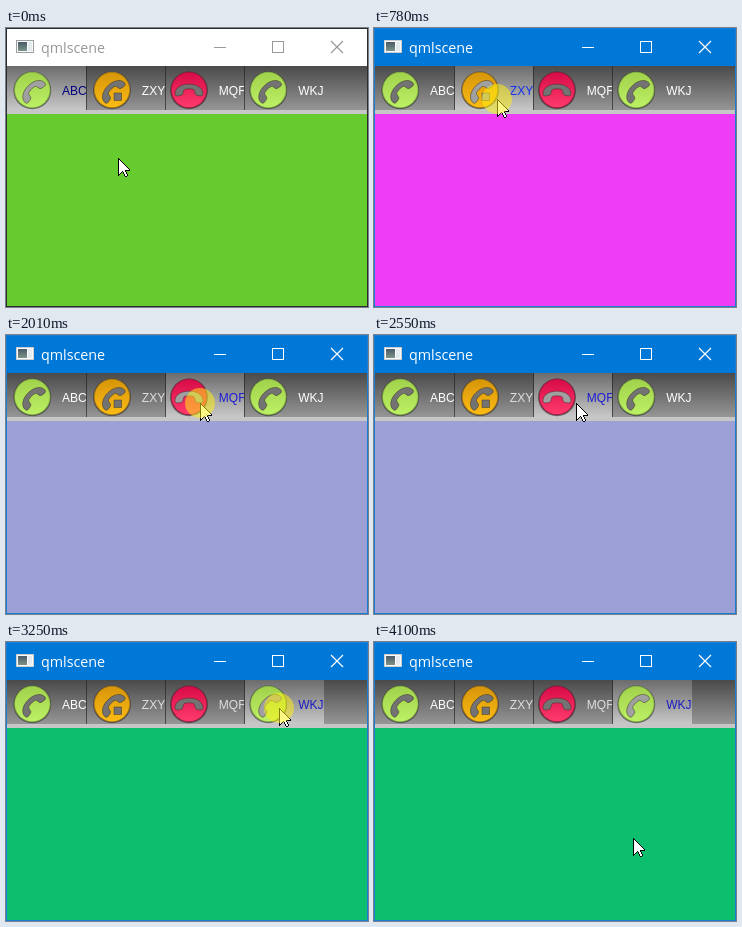
These frames come from a looping animation (362x279 px, 4.18 s). An HTML page with a canvas:

```html
<!DOCTYPE html>
<html lang="en">
<head>
<meta charset="utf-8">
<title>qmlscene</title>
<style>
html, body { margin: 0; width: 100%; height: 100%; overflow: hidden; }
canvas { display: block; width: 362px; height: 279px; }
</style>
</head>
<body>
<canvas id="stage"></canvas>
<script>
const W = 362, H = 279, LOOP = 4180;
const canvas = document.getElementById('stage');
const ctx = canvas.getContext('2d');
const dpr = window.devicePixelRatio || 1;
canvas.width = W * dpr;
canvas.height = H * dpr;

const LIME = ['#a2d24c', '#bcf064', '#83ad42'];
const tabs = [
  { x: 0, end: 80, icon: 26.3, label: 'ABC', textX: 56, skin: LIME, page: '#66cb2e', ink: '#00007c' },
  { x: 80, end: 159, icon: 106, label: 'ZXY', textX: 135.8, skin: ['#d8960a', '#fabb14', '#a87812'], page: '#ee3df4', ink: '#1230ea', house: true },
  { x: 159, end: 238, icon: 183, label: 'MQF', textX: 212.8, skin: ['#d80c48', '#ff3a6c', '#a01840'], page: '#9ca0d4', ink: '#1c1cd2', flat: true },
  { x: 238, end: 318, icon: 262.3, label: 'WKJ', textX: 292.2, skin: LIME, page: '#0cbf6e', ink: '#1c1cc4' }
];

// Moment from which each tab is the current one
const picks = [0, 780, 2010, 3250];
// Click halo visibility
const halos = [[780, 930], [2010, 2080], [3170, 3320]];
const moves = [
  { start: 80, end: 460, steps: 6, from: [112, 130], to: [123, 71] },
  { start: 1310, end: 1550, steps: 4, from: [123, 71], to: [194, 68] },
  { start: 2480, end: 2790, steps: 5, from: [194, 68], to: [273, 66] },
  { start: 3870, end: 4100, steps: 4, from: [273, 66], to: [259, 196] }
];

function pointerAt(t) {
  let pos = moves[0].from;
  for (const m of moves) {
    if (t < m.start) break;
    const gap = (m.end - m.start) / (m.steps - 1);
    const k = Math.min(m.steps, Math.floor((t - m.start) / gap + 1e-6) + 1);
    const p = k / m.steps, e = p * p * (3 - 2 * p);
    pos = m.from.map((v, i) => Math.round(v + (m.to[i] - v) * e));
  }
  return pos;
}

function rect(x, y, w, h, fill) {
  ctx.fillStyle = fill;
  ctx.fillRect(x, y, w, h);
}

function vertical(y0, y1, ...colors) {
  const g = ctx.createLinearGradient(0, y0, 0, y1);
  colors.forEach((c, i) => g.addColorStop(i / (colors.length - 1), c));
  return g;
}

function disc(x, y, r, fill) {
  ctx.fillStyle = fill;
  ctx.beginPath();
  ctx.arc(x, y, r, 0, Math.PI * 2);
  ctx.fill();
}

function text(str, x, y, font, fill) {
  ctx.font = font;
  ctx.fillStyle = fill;
  ctx.fillText(str, x, y);
}

function drawTitle(active) {
  const ink = active ? '#ffffff' : '#999999';
  rect(0, 0, W, 38, active ? '#0078d7' : '#ffffff');
  // Window symbol
  rect(10, 12, 18, 13, active ? '#c9ced2' : '#9b9fa2');
  rect(11, 13, 16, 11, '#fafafa');
  rect(12, 14, 9, 9, vertical(14, 23, '#4a5a68', '#7d9388'));
  rect(22, 14, 4, 9, '#e4ebee');

  text('qmlscene', 35, 25, '14.3px "Open Sans", "Noto Sans", sans-serif', ink);

  rect(208, 19, 12, 1, ink);
  ctx.strokeStyle = ink;
  ctx.lineWidth = 1;
  ctx.strokeRect(266.5, 13.5, 11, 11);
  ctx.lineWidth = 1.2;
  ctx.beginPath();
  ctx.moveTo(325, 13); ctx.lineTo(337, 25);
  ctx.moveTo(337, 13); ctx.lineTo(325, 25);
  ctx.stroke();
}

const handset = new Path2D('M-14 3.5C-13.5 -9 13.5 -9 14 3.5Q14 6 11.8 6L8 5.4Q6 5 5.9 2.6Q5.7 -.2 4.2 -.7Q0 -1.8 -4.2 -.7Q-5.7 -.2 -5.9 2.6Q-6 5 -8 5.4L-11.8 6Q-14 6 -14 3.5Z');
const house = new Path2D('M2 3H9.5V10.5H2Z');

function cutout(path, fill) {
  ctx.fillStyle = fill;
  ctx.fill(path);
  ctx.strokeStyle = 'rgba(50,45,30,.5)';
  ctx.lineWidth = 0.9;
  ctx.stroke(path);
}

function drawIcon(tab, selected) {
  const [top, bottom, rim] = tab.skin;
  const inside = selected ? '#a0a0a0' : '#737373';
  disc(tab.icon, 62.4, 18.9, 'rgba(40,40,40,.6)');
  disc(tab.icon, 62, 18.2, rim);
  disc(tab.icon, 62, 17.3, vertical(45, 79, top, bottom));
  ctx.save();
  ctx.translate(tab.icon, 62);
  if (tab.house) cutout(house, inside);
  if (!tab.flat) ctx.rotate(-Math.PI / 4);
  cutout(handset, inside);
  ctx.restore();
}

function drawTab(tab, i, current, hovered) {
  const selected = i === current;
  if (selected) rect(tab.x, 38, tab.end - tab.x, 44, vertical(38, 82, '#6c6c6c', '#c8c8c8'));
  if (i) rect(tab.x, 38, 1, 44, vertical(38, 82, '#303030', '#484848'));
  drawIcon(tab, selected);
  let ink = i && i < current ? '#dedede' : '#ffffff';
  if (selected) ink = tab.ink;
  else if (hovered) ink = '#0a780f';
  text(tab.label, tab.textX, 67, '12px "Liberation Sans", Arial, sans-serif', ink);
}

// One row per pixel line: # outline, . fill
const arrow = [];
for (let n = 0; n < 12; n++) arrow.push(n ? '#' + '.'.repeat(n - 1) + '#' : '#');
arrow.push('#......#####', '#...#..#', '#..# #..#', '#.#  #..#', '##    #..#', '#     #..#', '       ##');

function drawPointer(x, y) {
  arrow.forEach((row, r) => [...row].forEach((c, i) => {
    if (c !== ' ') rect(x + i, y + r, 1, 1, c === '#' ? '#000000' : '#ffffff');
  }));
}

function draw(t) {
  const current = picks.filter(p => t >= p).length - 1;
  const active = t >= picks[1];
  const [px, py] = pointerAt(t);

  ctx.setTransform(dpr, 0, 0, dpr, 0, 0);
  drawTitle(active);
  rect(0, 38, W, 44, vertical(38, 82, '#4a4a4a', '#969696'));
  rect(0, 82, W, 4, '#c6c6c6');
  rect(0, 86, W, H - 86, tabs[current].page);
  tabs.forEach((tab, i) => {
    const hovered = py >= 38 && py < 86 && px >= tab.x && px < tab.end;
    drawTab(tab, i, current, hovered);
  });

  ctx.strokeStyle = active ? '#1a7fd4' : '#2c2c2c';
  ctx.lineWidth = 1;
  ctx.strokeRect(0.5, 0.5, W - 1, H - 1);

  drawPointer(px, py);
  if (halos.some(([a, b]) => t >= a && t < b)) disc(px, py, 15, 'rgba(255,242,20,.52)');
}

const begin = performance.now();
function tick() {
  draw((performance.now() - begin) % LOOP);
  requestAnimationFrame(tick);
}
tick();
</script>
</body>
</html>
```
